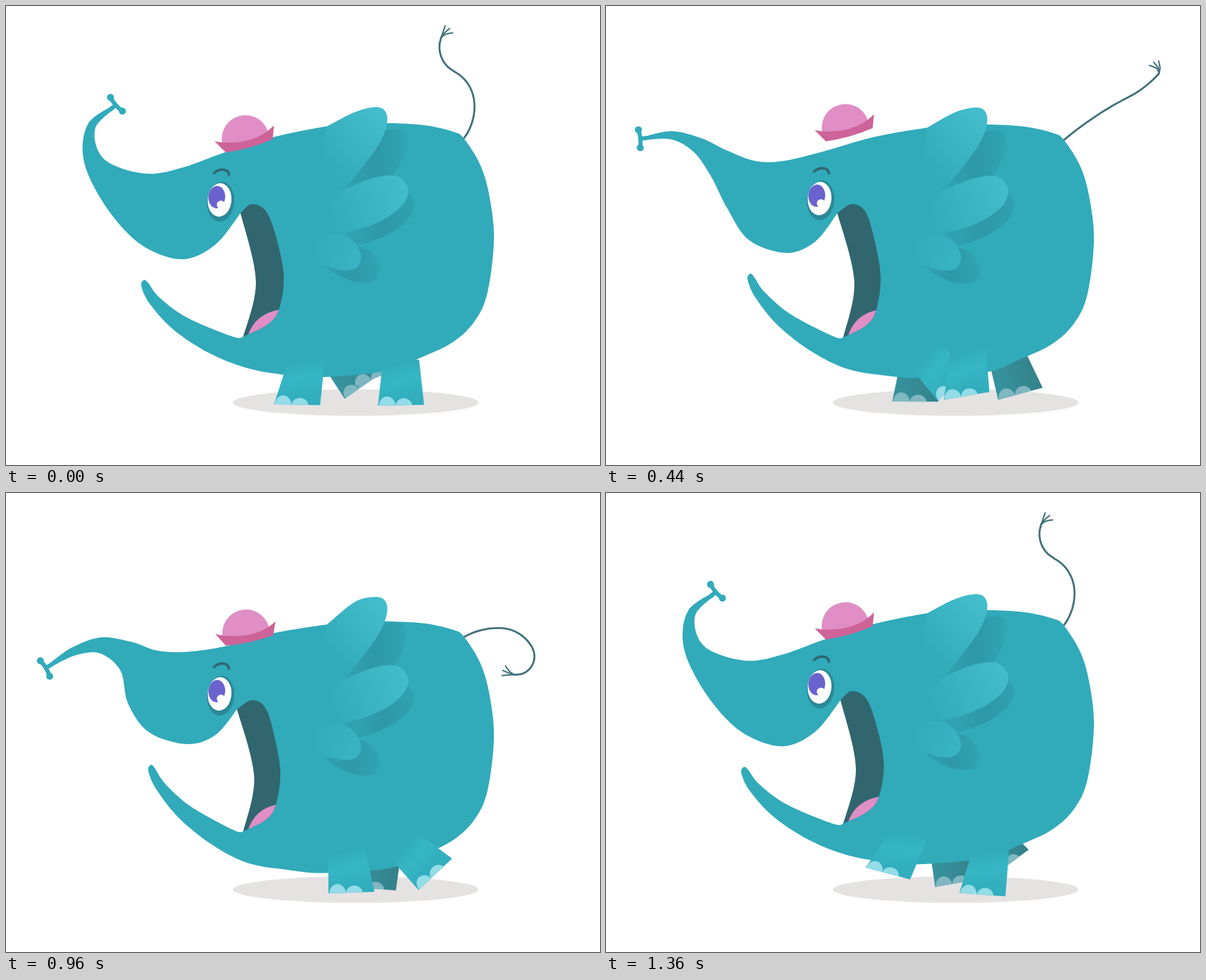
An HTML page with a canvas that plays this animation: 851x658 px, repeating every 1.4 s.

```html
<!DOCTYPE html>
<html lang="en">
<head>
<meta charset="utf-8">
<title>Running elephant</title>
<style>
html, body { margin: 0; width: 100%; height: 100%; overflow: hidden; background: #fff; }
canvas { display: block; }
</style>
</head>
<body>
<canvas id="stage" width="851" height="658"></canvas>
<script>
const ctx = document.getElementById('stage').getContext('2d');
const LOOP = 1400, STEP = 40, BODY_LOOP = 1360, STRIDE = 720;
const SKIN = '#31aaba', LIGHT = '#43bccc', DARK = '#31666f', PINK = '#e08ec5', ROSE = '#cd6398', HAIR = '#42707a';

// Vertical offsets and joint headings (degrees), keyed at shared times
const poseTimes = [0, 200, 440, 720, 960, 1120];
const tracks = {
  back:  [0, 16, 2, 7, 16, 7],
  belly: [0, 22, 1, 0, 11, 6],
  face:  [0, 16, -2, -4, 10, 4],
  nod:   [0, 15, -9, -20, -3, -2],
  pull:  [0, 2, 9, 12, 10, 9],
  hatY:  [0, 16.5, -16, -3.5, 10.5, -9.5],
  tilt:  [0, 0, 0, 7, 3.5, 0],
  rootX: [142, 152, 162, 160, 172, 166],
  rootY: [246, 255, 226, 233, 234, 228],
  trunkA: [239, 242, 221, 173, 203, 210],
  trunkB: [272, 245, 201, 173, 167, 187],
  trunkC: [319, 243, 174, 210, 149, 171],
  tailA: [308, 305, 320, 335, 330, 317],
  tailB: [266, 280, 326, 378, 362, 315],
  tailC: [208, 238, 333, 435, 422, 325],
  tailD: [290, 172, 312, 520, 545, 420],
  tuft:  [313, 143, 245, 445, 560, 468]
};

// Walk cycle of one foot
const front = { hip: 431, times: [0, 240, 420, 640],
  x: [384, 462, 481, 372], y: [571, 574, 568, 537], turn: [1, -2, -43, 15] };
const rear = { hip: 533, times: [0, 225, 320, 400, 520],
  x: [533, 596, 514, 494, 474], y: [573, 571, 552, 560, 572], turn: [-1, -43, -28, -17, 2] };

// Resting shapes
const jaw = [[325,474], [260,447], [220,418], [203,396], [197,393], [194,402],
  [206,427], [240,464], [290,497], [345,519], [402,529]];
const throat = [[352,284], [373,295], [388,335], [398,388], [391,435], [374,457], [340,474]];
const rump = [[455,532], [545,523], [592,505], [640,482], [672,451], [690,410], [699,335],
  [693,275], [680,229], [656,190], [640,180], [600,171], [548,168], [500,170]];
const lobes = [
  { x0: 465, y0: 235, x1: 545, y1: 165, shadow: [28, 32], color: LIGHT,
    shape: [[500,152], [530,145], [544,152], [545,172], [530,205], [485,263], [485,263], [455,240]] },
  { x0: 465, y0: 310, x1: 577, y1: 262, shadow: [8, 20], color: LIGHT,
    shape: [[482,264], [482,264], [528,246], [560,244], [576,261], [570,283], [545,304], [510,319], [473,327], [473,327], [455,300]] },
  { x0: 435, y0: 345, x1: 508, y1: 365, shadow: [27, 18], color: '#39b4c4',
    shape: [[473,327], [495,335], [508,355], [505,372], [488,379], [460,373], [432,355], [445,335]] }
];

const mix = (a, b, u) => a + (b - a) * u;
const unit = u => Math.max(0, Math.min(1, u));
const rad = degrees => degrees * Math.PI / 180;
const ahead = ([x, y], degrees, d) => [x + d * Math.cos(rad(degrees)), y + d * Math.sin(rad(degrees))];

// Smooth cyclic interpolation between keyed values
function sample(times, values, period, t) {
  const n = times.length;
  let i = n - 1;
  while (times[i] > t) i--;
  const [t0, t1, t2, t3] = [i - 1, i, i + 1, i + 2].map(k => times[(k + n) % n] + period * Math.floor(k / n));
  const [a, b, c, d] = [i - 1, i, i + 1, i + 2].map(k => values[(k + n) % n]);
  const span = t2 - t1, u = (t - t1) / span, v = 1 - u;
  const mb = (c - a) / (t2 - t0) * span, mc = (d - b) / (t3 - t1) * span;
  return v * v * ((1 + 2 * u) * b + u * mb) + u * u * ((3 - 2 * u) * c - v * mc);
}

// Spline through points; a repeated point makes a corner
function trace(points, open) {
  const n = points.length;
  const at = i => points[open ? Math.max(0, Math.min(n - 1, i)) : (i + n) % n];
  ctx.beginPath();
  ctx.moveTo(...points[0]);
  for (let i = 0; i < n - (open ? 1 : 0); i++) {
    const [ax, ay] = at(i - 1), [bx, by] = at(i), [cx, cy] = at(i + 1), [dx, dy] = at(i + 2);
    if (bx === cx && by === cy) continue;
    ctx.bezierCurveTo(bx + (cx - ax) / 6, by + (cy - ay) / 6, cx - (dx - bx) / 6, cy - (dy - by) / 6, cx, cy);
  }
}

function fill(style) { ctx.fillStyle = style; ctx.fill(); }

function stroke(style, width) {
  ctx.strokeStyle = style;
  ctx.lineWidth = width;
  ctx.stroke();
}

function ellipse(x, y, rx, ry, style, turn = 0) {
  ctx.beginPath();
  ctx.ellipse(x, y, rx, ry, turn, 0, 7);
  fill(style);
}

function blend(x0, y0, x1, y1, ...colors) {
  const g = ctx.createLinearGradient(x0, y0, x1, y1);
  colors.forEach((c, i) => g.addColorStop(i / (colors.length - 1), c));
  return g;
}

function drawLeg(foot, t, far) {
  const phase = (t + (far ? STRIDE / 2 : 0)) % STRIDE;
  const [x, y, turn] = ['x', 'y', 'turn'].map(k => sample(foot.times, foot[k], STRIDE, phase));
  const lean = Math.max(-6, (foot.hip - x) / 4);
  ctx.save();
  ctx.translate(x, y - (far ? 9 : 0));
  ctx.rotate(rad(turn));
  ctx.beginPath();
  ctx.moveTo(0, 0);
  ctx.lineTo(8 + lean, -65);
  ctx.lineTo(60 + lean, -65);
  ctx.lineTo(66, 0);
  ctx.closePath();
  fill(far ? blend(0, 0, 66, 0, '#36949f', '#34818a') : blend(30, -62, 38, -12, SKIN, '#36b7c6', '#32aebe'));
  ctx.clip();
  const nail = far ? '#80b7c0' : '#93dce8';
  ellipse(13, 1, 12, 14, nail);
  ellipse(37, 1, 12, 11, nail);
  ctx.restore();
}

function drawTail(p) {
  const bends = [p.tailA, p.tailB, p.tailC, p.tailD], count = 15;
  const points = [[655, 191 + p.back]];
  for (let i = 0; i < count; i++) {
    const s = 3 * (i + .5) / count, k = Math.floor(s);
    points.push(ahead(points[i], mix(bends[k], bends[k + 1], s - k), 168 / count));
  }
  trace(points, true);
  stroke(HAIR, 2.8);
  const end = points[count];
  for (const spread of [-24, 0, 24]) {
    trace([end, ahead(end, mix(p.tailD, p.tuft + spread, .7), 8), ahead(end, p.tuft + spread, 18)], true);
    stroke(HAIR, 2);
  }
}

// Bending spine with tapering sides
function trunk(p) {
  const { trunkA: a, trunkB: b, trunkC: c } = p;
  const facing = [(a + 200) / 2, (a + b) / 2, (b + c) / 2, c];
  const spine = [[p.rootX, p.rootY]];
  [a, b, c].forEach((h, i) => spine.push(ahead(spine[i], h, 40)));
  const side = sign => spine.map((s, i) => ahead(s, facing[i] + 90, sign * [22, 11.5, 6, 2.5][i]));
  return { top: side(1), under: side(-1).reverse(), end: spine[3] };
}

function drawTrunkTip(end, heading) {
  const fork = ahead(end, heading, 4), front = ahead(end, heading, 7);
  const left = ahead(front, heading - 90, 13), right = ahead(front, heading + 90, 13);
  ctx.beginPath();
  ctx.moveTo(...ahead(end, heading, -4));
  ctx.lineTo(...fork);
  ctx.moveTo(...left);
  ctx.quadraticCurveTo(...fork, ...right);
  stroke(SKIN, 6);
  ellipse(...left, 5, 5, SKIN);
  ellipse(...right, 5, 5, SKIN);
}

function drawBody(p) {
  const { back, belly, face, nod, pull } = p;
  const mid = (back + face) / 2, rise = p.rootY - 246;
  const { top, under, end } = trunk(p);
  const sag = .16 * (p.trunkA - 173);
  const lip = [336 - pull / 2, 297 + mid];
  const mouth = throat.map(([x, y]) => [
    x - pull * .5 * unit((x - 365) / 30), y + mix(mid, belly, (y - 284) / 190)]);
  const chin = mouth[mouth.length - 1], gum = mouth[4];
  const gap = [mix(lip[0], chin[0], .5) + 20, mix(lip[1], chin[1], .5) + 9];

  const brow = [[460, 172.5 + back], [383, 188 + mid], [313, 210 + face], [255, 231 + nod],
    [205 + pull, (231 + nod + top[0][1]) / 2 + sag]];
  const snout = [[165 + pull, 316 + rise + nod * .6], [205, 349 + nod * .8 + rise * .3],
    [255 + pull * .4, 363 + nod], [300, 342 + (nod + mid) / 2], lip];
  const lowerJaw = jaw.map(([x, y]) => {
    const w = unit((x - 197) / 145);
    return [x + pull * (1 - w), y + mix(nod, belly, w)];
  });
  const torso = rump.map(([x, y]) => [x, y + mix(belly, back, unit((x - 400) / 150))]);

  trace([...brow, ...top, top[3], under[0], ...under, ...snout, lip,
    [gap[0] + 12, gap[1]], chin, chin, ...lowerJaw, ...torso]);
  fill(SKIN);
  drawTrunkTip(end, p.trunkC);

  ctx.save();
  trace([lip, ...mouth, chin, gap, lip]);
  fill(DARK);
  ctx.clip();
  ctx.beginPath();
  ctx.moveTo(chin[0] + 6, chin[1]);
  ctx.quadraticCurveTo(chin[0] + 16, gum[1] + 6, gum[0] + 2, gum[1]);
  ctx.lineTo(gum[0] + 10, chin[1] + 20);
  ctx.lineTo(chin[0] + 6, chin[1] + 20);
  fill(PINK);
  ctx.restore();

  drawEar(brow[0], back / 2);
}

function drawEar(root, dy) {
  const shade = 'rgba(42,140,156,.6)', clear = 'rgba(42,140,156,0)';
  const outline = (lobe, sx, sy) => {
    const shape = lobe.shape.map(([x, y]) => [x + sx, y + sy]);
    const join = [root[0] + sx, root[1] + sy - dy / 2];
    trace(lobe === lobes[0] ? [join, join, ...shape] : shape);
  };
  for (const lobe of lobes) {
    outline(lobe, lobe.shadow[0], lobe.shadow[1] + dy);
    fill(blend(lobe.x0, 0, lobe.x1 + 45, 0, clear, shade, clear));
  }
  for (const lobe of lobes) {
    outline(lobe, 0, dy / 2);
    fill(blend(lobe.x0, lobe.y0, lobe.x1, lobe.y1, SKIN, lobe.color));
  }
}

function drawFace(dy) {
  ctx.save();
  ctx.translate(0, dy);
  ellipse(307.5, 280.5, 19.5, 28.5, '#2b8997', .08);
  ellipse(306, 278, 17, 24, '#fff', .08);
  ellipse(302, 274, 12, 16, '#6a63ce', .08);
  ellipse(308, 285, 6, 6, '#fff');
  ctx.beginPath();
  ctx.moveTo(298, 239.5);
  ctx.bezierCurveTo(305, 233, 318, 232, 319.5, 242);
  stroke('#2f6670', 3.4);
  ctx.restore();
}

function drawHat(dy, tilt) {
  ctx.save();
  ctx.translate(341.5 + tilt * .4, 182.5 + dy);
  ctx.rotate(rad(tilt));
  ctx.translate(-341.5, -182.5);
  ctx.beginPath();
  ctx.arc(343, 190.5, 34, Math.PI * .95, Math.PI * 1.98);
  ctx.lineTo(345, 202);
  fill(PINK);
  ctx.beginPath();
  ctx.moveTo(299, 194);
  ctx.bezierCurveTo(325, 199, 362, 195, 384, 171);
  ctx.lineTo(382, 191);
  ctx.quadraticCurveTo(350, 205, 315, 210);
  ctx.closePath();
  fill(ROSE);
  ctx.restore();
}

// The body also sinks during the far legs' steps
function sink(t) {
  const hump = (from, to) => t > from && t < to ? Math.sin(Math.PI * (t - from) / (to - from)) ** 2 : 0;
  return 12 * (hump(440, 720) + hump(1120, BODY_LOOP));
}

function draw(t) {
  const bodyTime = t % BODY_LOOP;
  const pose = {};
  for (const name in tracks) pose[name] = sample(poseTimes, tracks[name], BODY_LOOP, bodyTime);

  ctx.fillStyle = '#fff';
  ctx.fillRect(0, 0, 851, 658);
  ctx.lineCap = ctx.lineJoin = 'round';
  ellipse(501, 568.5, 176, 19, '#e5e2e2');
  drawLeg(front, t, true);
  drawLeg(rear, t, true);

  ctx.save();
  ctx.translate(0, sink(bodyTime));
  drawTail(pose);
  drawBody(pose);
  drawFace(pose.face);
  drawHat(pose.hatY, pose.tilt);
  ctx.restore();

  drawLeg(front, t);
  drawLeg(rear, t);
}

const start = performance.now();
function tick() {
  const t = (performance.now() - start) % LOOP;
  draw(Math.floor(t / STEP) * STEP);
  requestAnimationFrame(tick);
}
tick();
</script>
</body>
</html>
```
